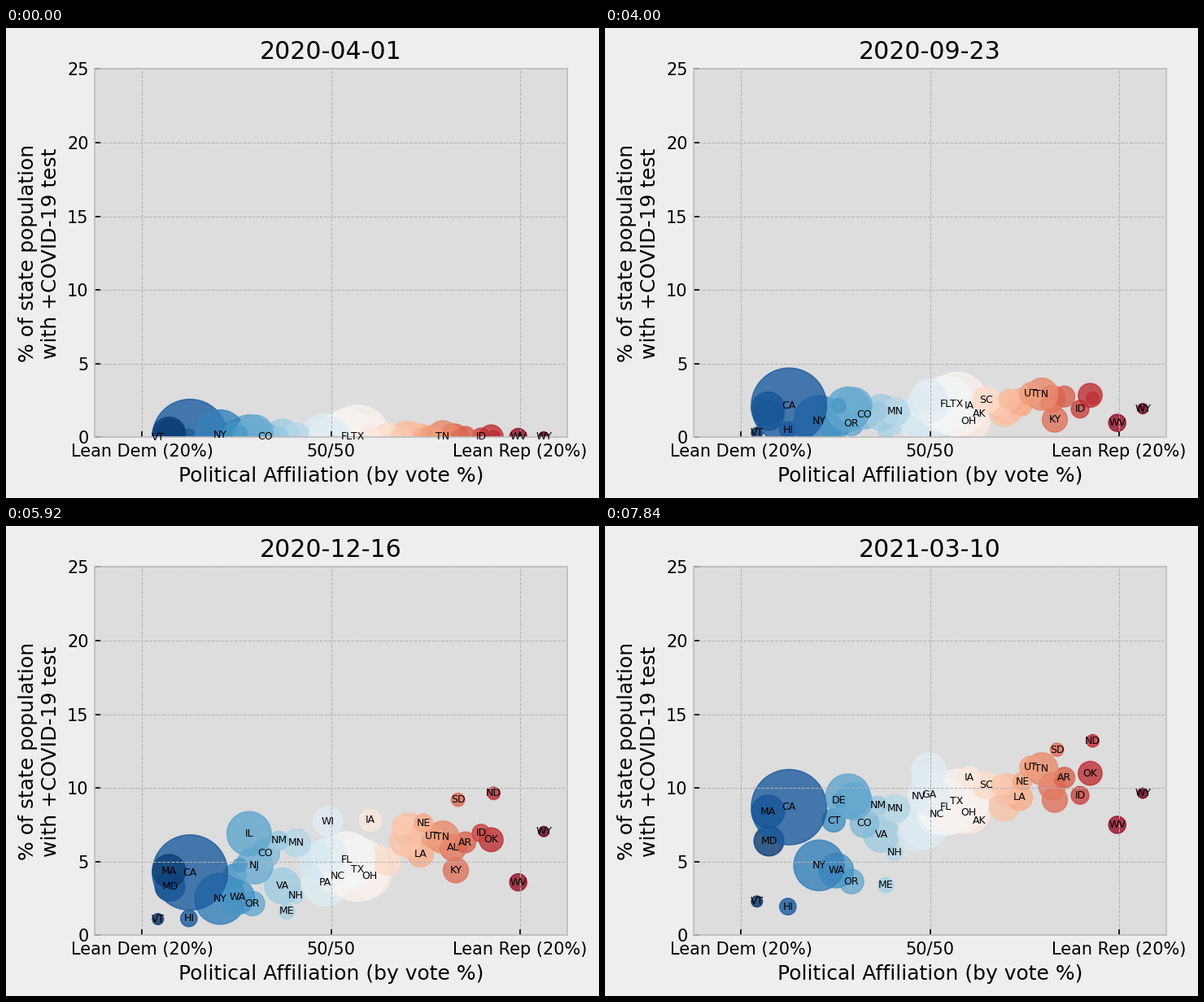
A matplotlib script that plays this animation: 729x578 px, repeating every 8 s.

```python
import numpy as np
import matplotlib.pyplot as plt
from matplotlib.animation import FuncAnimation

WIDTH, HEIGHT, DPI = 729, 578, 150
WEEKS = 50
KNOTS = np.array([0, 11, 19, 30, 37, 41, 49])  # weeks since April 1st

# share of the final level reached at each knot, then
# state: (two-party lean, final % positive)
SPRING = [.03, .17, .20, .28, .52, .71, 1], dict(
    CT=(-10.19, 7.8), DE=(-9.63, 9.15), MA=(-17.12, 8.4),
    MD=(-17.03, 6.4), NJ=(-8.07, 9.1), NY=(-11.73, 4.75))
STEADY = [.003, .045, .18, .31, .49, .735, 1], dict(
    AZ=(-.16, 11.25), CA=(-14.91, 8.7), GA=(-.12, 9.55), NC=(.68, 8.2),
    SC=(5.93, 10.2), TX=(2.83, 9.1), VA=(-5.15, 6.85))
SUMMER = [.003, .05, .18, .34, .59, .80, 1], dict(
    AL=(12.91, 10.1), AR=(14.21, 10.7), FL=(1.69, 8.7), HI=(-15.03, 1.95),
    LA=(9.47, 9.35), MS=(8.38, 10), NV=(-1.22, 9.45), OK=(16.94, 11),
    OR=(-8.30, 3.65), TN=(11.83, 11.3), UT=(10.69, 11.4), WA=(-9.92, 4.4))
AUTUMN = [.003, .055, .12, .31, .73, .87, 1], dict(
    AK=(5.26, 7.8), CO=(-6.94, 7.6), IA=(4.18, 10.7), ID=(15.87, 9.5),
    IL=(-8.66, 9.45), IN=(8.19, 9.9), KS=(7.49, 10.2), MI=(-1.41, 6.95),
    MN=(-3.64, 8.6), MO=(7.84, 8.8), MT=(8.40, 9.5), ND=(17.21, 13.2),
    NE=(9.78, 10.45), NM=(-5.52, 8.8), SD=(13.43, 12.6), WI=(-.32, 10.6),
    WY=(22.50, 9.65))
WINTER = [.003, .055, .095, .18, .48, .73, 1], dict(
    KY=(13.20, 9.2), ME=(-4.67, 3.4), NH=(-3.75, 5.6), OH=(4.08, 8.35),
    PA=(-.59, 7.45), VT=(-18.30, 2.3), WV=(19.80, 7.5))
GROUPS = [SPRING, STEADY, SUMMER, AUTUMN, WINTER]

BY_SIZE = ("CA TX FL NY PA IL OH GA NC MI NJ VA WA AZ MA TN IN MO MD WI CO MN "
           "SC AL LA KY OR OK CT UT IA NV AR MS KS NM NE ID WV HI NH ME MT DE "
           "SD ND AK VT WY").split()

names = [name for _, states in GROUPS for name in states]
lean, final = np.array([v for _, states in GROUPS for v in states.values()]).T
group = np.repeat(range(len(GROUPS)), [len(states) for _, states in GROUPS])

# population in millions falls with the log of the rank, plus a few giants
rank = np.array([BY_SIZE.index(name) for name in names])
pop = 23.1 - 5.75 * np.log(rank + 1) + 16.4 * np.exp(-.6 * rank)

# monotone cubic slopes of the shared curves
curves = np.array([curve for curve, _ in GROUPS])
steps = np.diff(KNOTS)
rates = np.diff(curves, axis=1) / steps
inner = 2 * rates[:, :-1] * rates[:, 1:] / (rates[:, :-1] + rates[:, 1:])
slopes = np.hstack([rates[:, :1], inner, rates[:, -1:]])


def level_at(week):
    k = min(np.searchsorted(KNOTS, week, side="right") - 1, len(steps) - 1)
    h = steps[k]
    u = (week - KNOTS[k]) / h
    share = ((1 + 2 * u) * (1 - u) ** 2 * curves[:, k]
             + u * (1 - u) ** 2 * h * slopes[:, k]
             + u * u * (3 - 2 * u) * curves[:, k + 1]
             + u * u * (u - 1) * h * slopes[:, k + 1])
    return final * share[group]


def crowded(y):
    """True for each state with a neighbour closer than one unit."""
    gap = np.hypot(lean[:, None] - lean, y[:, None] - y)
    np.fill_diagonal(gap, np.inf)
    return gap.min(axis=1) < 1


plt.rcParams.update({
    "font.family": "DejaVu Sans", "font.size": 10,
    "axes.titlesize": "x-large", "axes.labelsize": "large",
    "axes.facecolor": "#dddddd", "axes.edgecolor": "#bcbcbc",
    "figure.facecolor": "#eeeeee", "axes.grid": True,
    "grid.color": "#b2b2b2", "grid.linestyle": "--", "grid.linewidth": .5,
    "xtick.direction": "in", "ytick.direction": "in",
})

fig = plt.figure(figsize=((WIDTH + 1e-6) / DPI, (HEIGHT + 1e-6) / DPI), dpi=DPI)
ax = fig.add_axes([108.9 / WIDTH, 74.6 / HEIGHT, 581.25 / WIDTH, 453 / HEIGHT])
ax.set(xlim=(-25, 25), ylim=(0, 25), yticks=range(0, 26, 5),
       xlabel="Political Affiliation (by vote %)",
       ylabel="% of state population\nwith +COVID-19 test")
ax.set_xticks([-20, 0, 20], ["Lean Dem (20%)", "50/50", "Lean Rep (20%)"])
title = ax.set_title("2020-04-01")

tone = (lean - lean.min()) / np.ptp(lean)
colors = plt.get_cmap("RdBu_r")(tone)
colors[:, 3] = .8
sizes = pop * 50
bubbles = ax.scatter(lean, level_at(0), s=sizes, c=colors, linewidths=.75)
labels = [ax.text(x, 0, name, size=6, ha="center", va="center")
          for x, name in zip(lean, names)]


def update(week):
    y = level_at(week)
    order = np.argsort(y)  # higher bubbles lie on top
    bubbles.set_offsets(np.column_stack([lean, y])[order])
    bubbles.set_sizes(sizes[order], DPI)
    bubbles.set_facecolor(colors[order])
    for label, height, hidden in zip(labels, y, crowded(y)):
        label.set_y(height)
        label.set_visible(not hidden)
    title.set_text(str(np.datetime64("2020-04-01") + 7 * week))
    return [bubbles, title, *labels]


anim = FuncAnimation(fig, update, frames=WEEKS, interval=160,
                     init_func=lambda: update(0), repeat=True, repeat_delay=0)
plt.show()
```
